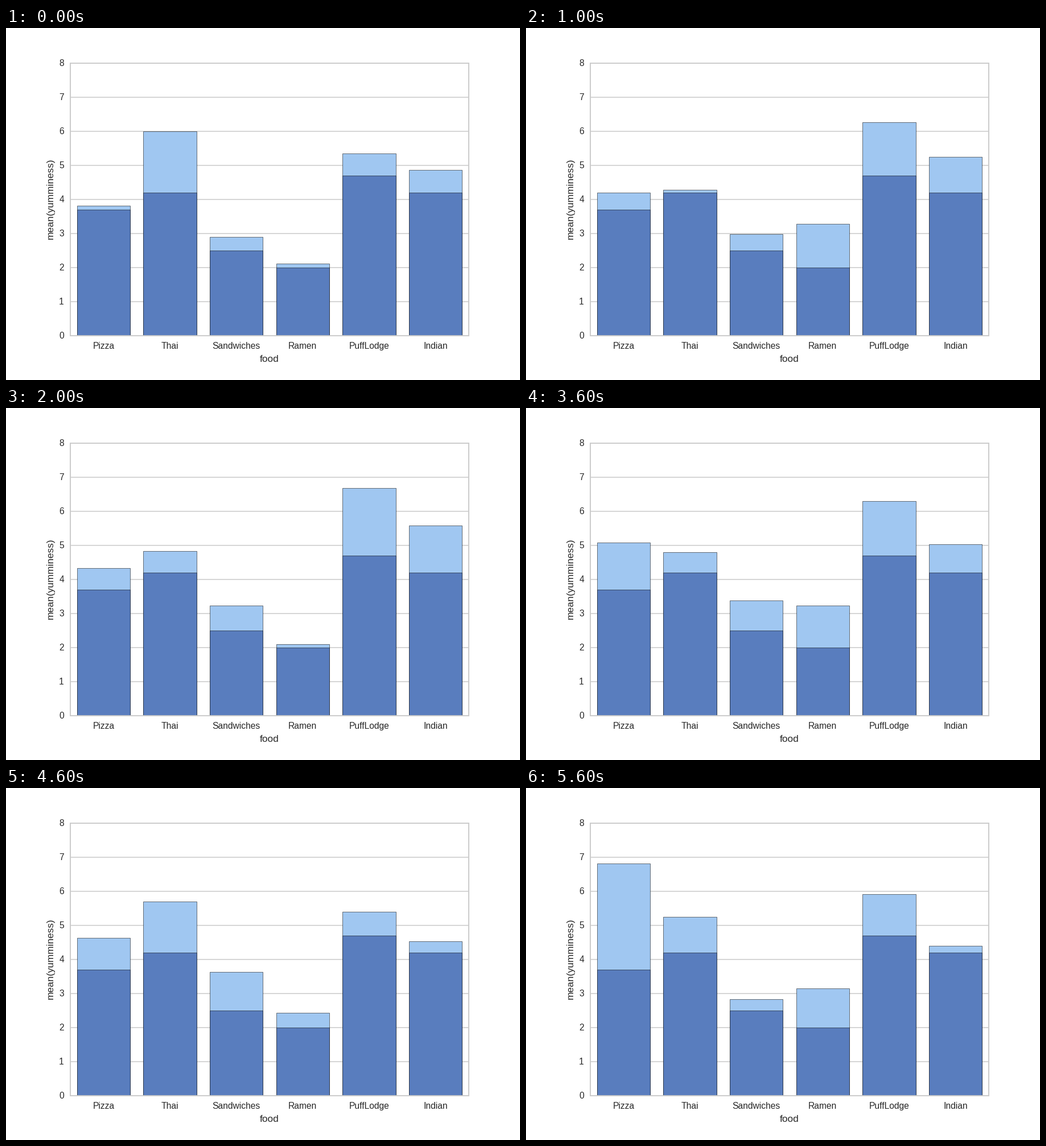
A matplotlib script that plays this animation: 903 by 620 pixels, repeating every 6 s.

```python
import matplotlib.pyplot as plt
from matplotlib.animation import FuncAnimation

WIDTH, HEIGHT = 903, 620
DPI = WIDTH / 8
LEFT, BOTTOM, AX_W, AX_H = 112.925, 77.6, 700.14, 480.4
DARK, LIGHT = "#597dbe", "#a0c7f1"
INK, RULE = "0.15", "0.8"
STEPS = 6

# Each food: its fixed mean, then the extra stacked on it at each step.
FOODS = {
    "Pizza": (3.7, [0.12, 0.50, 0.64, 1.38, 0.94, 3.11]),
    "Thai": (4.2, [1.80, 0.09, 0.63, 0.60, 1.50, 1.05]),
    "Sandwiches": (2.5, [0.40, 0.49, 0.74, 0.89, 1.14, 0.34]),
    "Ramen": (2.0, [0.12, 1.29, 0.10, 1.24, 0.44, 1.15]),
    "PuffLodge": (4.7, [0.65, 1.57, 1.98, 1.60, 0.70, 1.22]),
    "Indian": (4.2, [0.67, 1.05, 1.38, 0.83, 0.33, 0.20]),
}

plt.rcParams["font.family"] = "Liberation Sans"

# The tiny margin keeps the pixel height from rounding down.
fig = plt.figure(figsize=(8, (HEIGHT + 0.001) / DPI), dpi=DPI, facecolor="white")
ax = fig.add_axes([LEFT / WIDTH, BOTTOM / HEIGHT, AX_W / WIDTH, AX_H / HEIGHT])


def totals_at(step):
    return [base + extra[step % STEPS] for base, extra in FOODS.values()]


def draw_bars(heights, color, z):
    return ax.bar(range(len(FOODS)), heights, width=0.8, color=color,
                  edgecolor="black", linewidth=0.33, zorder=z)


totals = draw_bars(totals_at(0), LIGHT, 1)
draw_bars([base for base, _ in FOODS.values()], DARK, 1.1)

ax.set_xlim(-0.5, len(FOODS) - 0.5)
ax.set_ylim(0, 8)
ax.set_xticks(range(len(FOODS)), list(FOODS))
ax.set_yticks(range(9), [str(n) for n in range(9)], va="center")
ax.tick_params(length=0, pad=7, labelsize=10, labelcolor=INK)
ax.set_xlabel("food", fontsize=11, color=INK, labelpad=5)
ax.set_ylabel("mean(yumminess)", fontsize=11, color=INK, labelpad=5, y=0.5025)
ax.set_axisbelow(True)
ax.grid(axis="y", color=RULE, linewidth=1)
for spine in ax.spines.values():
    spine.set(color=RULE, linewidth=1.25)


def update(step):
    for bar, height in zip(totals, totals_at(step)):
        bar.set_height(height)
    return list(totals)


anim = FuncAnimation(fig, update, frames=STEPS, interval=1000,
                     repeat=True, repeat_delay=0, blit=False)
plt.show()
```
